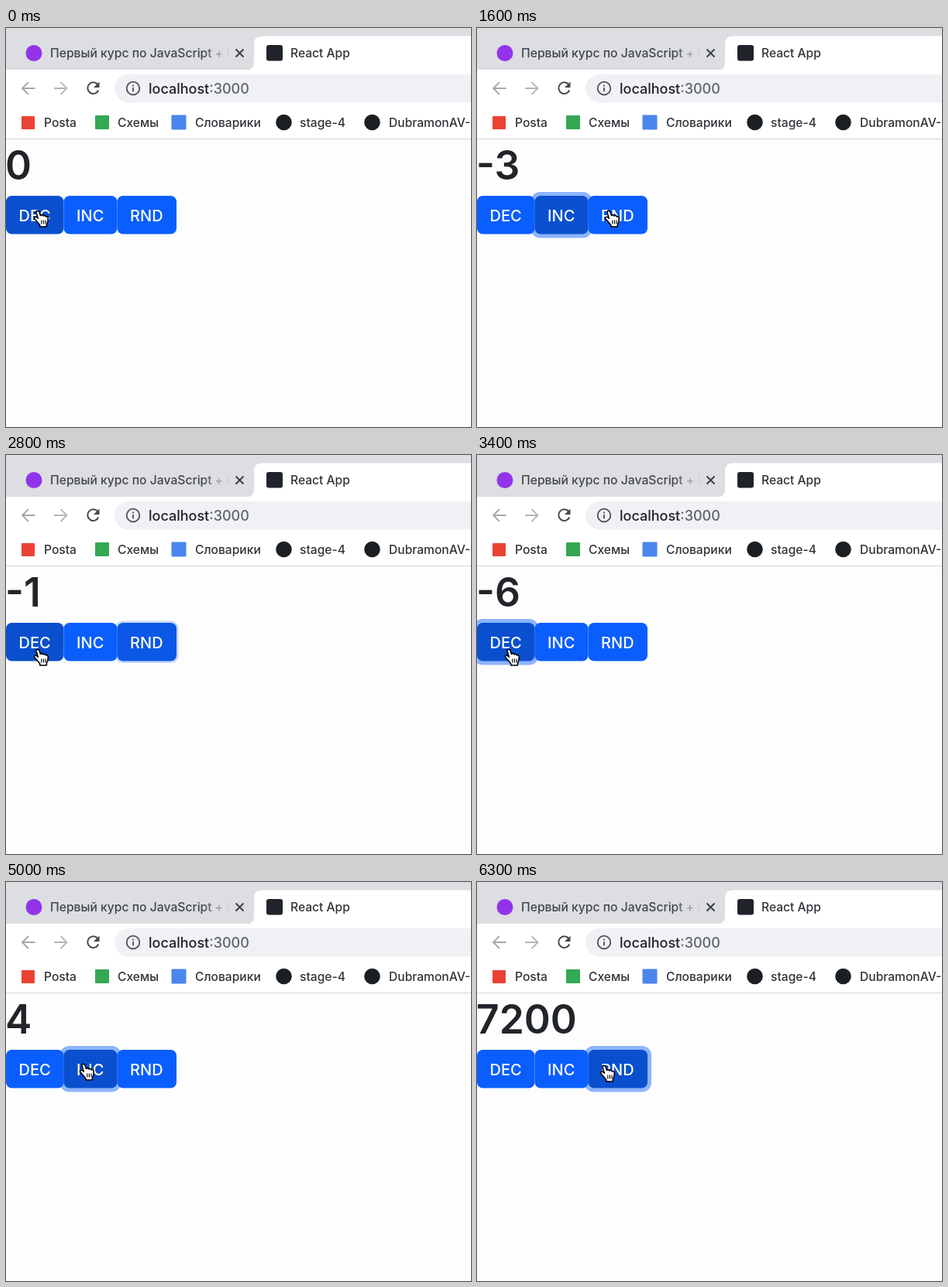
These frames come from a looping animation (600x516 px, 6.7 s). An HTML page with a canvas:

```html
<!DOCTYPE html>
<html lang="ru">
<head>
<meta charset="utf-8">
<title>Counter</title>
<style>
  html, body { margin: 0; width: 100%; height: 100%; overflow: hidden; background: #fff; }
  canvas { display: block; width: 600px; height: 516px; }
</style>
</head>
<body>
<canvas id="stage" width="600" height="516"></canvas>
<script>
const ctx = document.getElementById('stage').getContext('2d');
const LOOP = 6700, STEP = 100;
const FADE = 100, TRAVEL = 200, SETTLE = 60, PRESS = 50, HOVER_LAG = 100;
const INK = '#303338', BLUE = [11, 94, 254], DARK_BLUE = [10, 80, 206];

const buttons = [
  { label: 'DEC', x: 0, w: 74.5 },
  { label: 'INC', x: 74.5, w: 69 },
  { label: 'RND', x: 143.5, w: 76.5 },
];
const [DEC, INC, RND] = buttons;

const add = (n, times) => Array(times).fill(v => v + n);
const multiply = (...factors) => factors.map(f => v => v * f);

// Each visit: first click time, pause between clicks, pointer rest position.
const visits = [
  { button: DEC, at: 90, gap: 118, x: 45, y: 246, clicks: add(-1, 6) },
  { button: INC, at: 1045, gap: 118, x: 104, y: 245, clicks: add(1, 3) },
  { button: RND, at: 1660, gap: 200, x: 174, y: 246, clicks: multiply(4, 5, 5, 0) },
  { button: DEC, at: 2800, gap: 118, x: 45, y: 261, clicks: add(-1, 7) },
  { button: INC, at: 3732, gap: 118, x: 104, y: 245, clicks: add(1, 11) },
  { button: RND, at: 5410, gap: 200, x: 168, y: 247, clicks: multiply(3, 4, 5, 5, 6) },
];

const clamp = v => Math.max(0, Math.min(1, v));
const mix = (a, b, k) => a + (b - a) * k;

function counterAt(t) {
  let value = 0;
  for (const { at, gap, clicks } of visits)
    clicks.forEach((click, i) => { if (t >= at + gap * i) value = click(value); });
  return value;
}

// Eased travel that swings past the straight line when the height changes.
function pointerAt(t) {
  let { x, y } = visits[0];
  for (const next of visits) {
    const u = clamp((t - next.at + SETTLE) / TRAVEL + 1);
    x = mix(x, next.x, u * u * (3 - 2 * u));
    y = mix(y, next.y, u + Math.sin(Math.PI * u));
  }
  return { x, y };
}

// The ring grows after a click and fades once another button is pressed.
function focusAt(button, t) {
  return Math.max(...visits.map((visit, i) => {
    const end = i + 1 < visits.length ? visits[i + 1].at - PRESS : LOOP;
    return visit.button === button
      ? clamp(Math.min((t - visit.at) / FADE, 1 - (t - end) / FADE)) : 0;
  }));
}

function isHovered({ x, w }, t) {
  const tip = pointerAt(t - HOVER_LAG).x - 3;
  return tip >= x && tip < x + w;
}

function text(str, x, y, size, color, weight = 450) {
  ctx.font = `${weight} ${size}px Inter, sans-serif`;
  ctx.fillStyle = color;
  ctx.fillText(str, x, y);
  return x + ctx.measureText(str).width;
}

function box(x, y, w, h, r, color) {
  ctx.fillStyle = color;
  ctx.beginPath();
  ctx.roundRect(x, y, w, h, r);
  ctx.fill();
}

const dot = (x, y, r, color) => box(x - r, y - r, r * 2, r * 2, r, color);

function line(d, color, width) {
  ctx.strokeStyle = color;
  ctx.lineWidth = width;
  ctx.stroke(new Path2D(d));
}

function drawTabs() {
  box(0, 0, 600, 54, 0, '#dcdee2');
  ctx.fillStyle = '#fff';
  ctx.fill(new Path2D('M310 54.5 Q320 54.5 320 44 V20.5 Q320 10.5 330 10.5 H600 V54.5 Z'));

  dot(36, 32.5, 10.5, '#9233ea');
  const fade = ctx.createLinearGradient(255, 0, 289, 0);
  fade.addColorStop(0, 'rgba(66,69,74,1)');
  fade.addColorStop(1, 'rgba(66,69,74,0)');
  text('Первый курс по JavaScript + React', 57, 38, 15.7, fade);
  line('M296.5 27.5 l10 10 m0 -10 l-10 10', '#3c4043', 2);

  box(336, 22, 21, 20.5, 3, '#20232a');
  text('React App', 367, 38, 15.6, INK);
}

function drawToolbar() {
  line('M37.5 78 H21 M29 70 L21 78 L29 86', '#a4a7ab', 1.8);
  line('M62 78 H78.5 M70.5 70 L78.5 78 L70.5 86', '#b4b6ba', 1.8);
  line('M118.2 73 A7.3 7.3 0 1 0 119.3 80.5', '#45484d', 2);
  ctx.fillStyle = '#45484d';
  ctx.fill(new Path2D('M120.5 69.5 V77 H113 Z'));

  box(140, 60, 500, 36.5, 18.25, '#eff1f4');
  line('M172.3 78 a8.3 8.3 0 1 0 -16.6 0 a8.3 8.3 0 1 0 16.6 0 M164 77 v5.3 M164 73.4 v2', '#4c4f54', 1.8);
  const end = text('localhost', 184, 84.5, 18, '#202124');
  text(':3000', end, 84.5, 18, '#5f6368');
}

function drawBookmarks() {
  box(20, 114, 17, 17, 1, '#ea4335');
  box(115, 113, 18, 18, 1, '#34a853');
  box(213.5, 112.5, 19, 19, 1, '#4a86ee');
  dot(358.5, 122, 10.3, '#1b1f23');
  dot(472.5, 122, 10.3, '#1b1f23');
  const labels = { 'Posta': 49, 'Схемы': 144, 'Словарики': 244, 'stage-4': 379, 'DubramonAV-Fi': 494 };
  for (const [label, x] of Object.entries(labels)) text(label, x, 127.5, 15.6, INK);
  box(0, 143, 600, 1, 0, '#d5d6d9');
}

function drawRing(button, t) {
  const focus = focusAt(button, t), spread = 5 * focus;
  box(button.x - spread, 217 - spread, button.w + spread * 2, 49.5 + spread * 2, 7 + spread,
    `rgba(141,180,251,${focus})`);
}

function drawButton(button, t) {
  const dark = isHovered(button, t) ? 1 : focusAt(button, t);
  const color = BLUE.map((c, i) => Math.round(mix(c, DARK_BLUE[i], dark)));
  box(button.x, 217, button.w, 49.5, 7.5, `rgb(${color})`);
  text(button.label, button.x + 16.6, 249.5, 20, '#fff');
}

const hand = new Path2D('M-6 -7.5 C-6.5 -10 -3 -10.5 -2 -8 L-.5 -3.5 C.5 -5 2.5 -4.5 3 -3 ' +
  'C4 -4.3 6 -3.5 6.2 -2 C7.5 -3 9.3 -2 9.3 0 C9.5 4 8.5 6 7.5 8 L7.3 11 L-1 11 L-1.5 8.5 ' +
  'C-4 6 -6 3 -8 1 C-9.5 -1 -7 -2.8 -5 -1 L-3.7 .3 Z');

function drawHand({ x, y }) {
  ctx.save();
  ctx.translate(x, y);
  ctx.lineJoin = 'round';
  ctx.fillStyle = '#fff';
  ctx.fill(hand);
  ctx.strokeStyle = '#000';
  ctx.lineWidth = 1.6;
  ctx.stroke(hand);
  line('M.8 2.5 v5 M3.4 2.5 v5 M6 2.5 v5', '#000', 1.1);
  ctx.restore();
}

function draw(now) {
  const t = Math.floor((now % LOOP) / STEP) * STEP;
  box(0, 0, 600, 516, 0, '#fff');
  drawTabs();
  drawToolbar();
  drawBookmarks();
  box(0, 144, 600, 372, 0, '#fefdfe');
  text(String(counterAt(t)), -1, 196, 51.5, '#212529', 600);
  buttons.forEach(button => drawRing(button, t));
  buttons.forEach(button => drawButton(button, t));
  drawHand(pointerAt(t));
}

let start;
function tick(now) {
  start ??= now;
  draw(now - start);
  requestAnimationFrame(tick);
}
draw(0);
requestAnimationFrame(tick);
</script>
</body>
</html>
```
